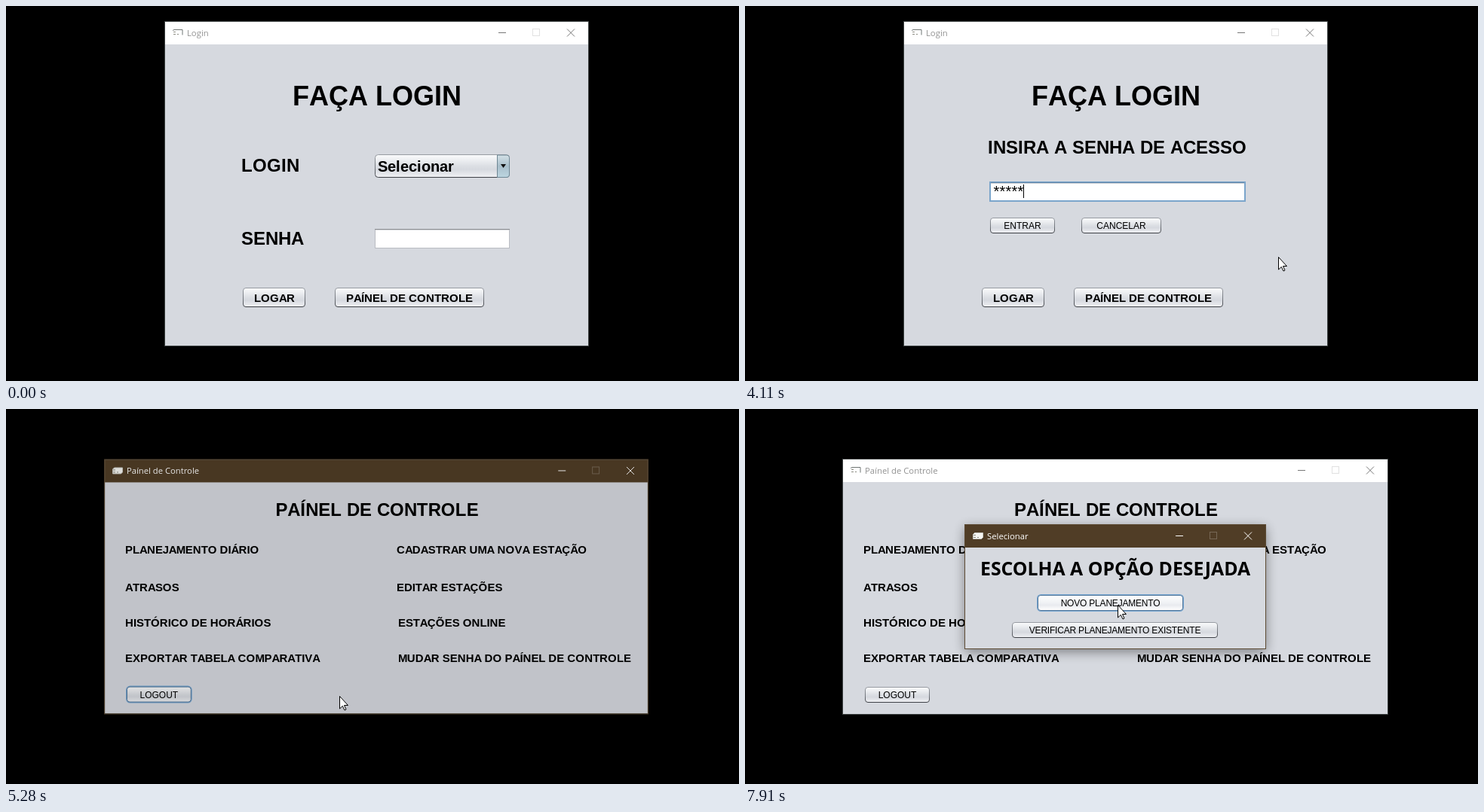
Write an HTML page that moves like this. It is 972 px wide and 498 px high and loops after 8 s.

```html
<!DOCTYPE html>
<html lang="pt">
<head>
<meta charset="utf-8">
<title>Login</title>
<style>
html, body { margin: 0; width: 100%; height: 100%; overflow: hidden; background: #000; }
svg { display: block; width: 100vw; height: 100vh; }
text { font-family: "Liberation Sans", Arial, sans-serif; fill: #000; white-space: pre; }
.b { font-weight: 700; }
.mid { text-anchor: middle; }
.cap { font-family: "Open Sans", "Noto Sans", sans-serif; font-size: 11.3px; }
.head { font-family: "Open Sans", "Noto Sans", sans-serif; font-weight: 700; font-size: 24.8px; }
.win .bar { fill: #fff; }
.win .cap { fill: #929292; }
.win .glyph { stroke: #777; fill: none; }
.win .card { visibility: hidden; fill: #f6f6f2; stroke: #c9c9c4; }
.win .marks { stroke: #8a8a80; fill: none; }
.win .outline { stroke: #6f7573; fill: none; }
.win .edge { stroke: #3c4141; fill: none; }
.win.on .bar { fill: #503d26; }
.win.on .cap { fill: #fff; }
.win.on .glyph { stroke: #fff; }
.win.on .card { visibility: visible; }
.win.on .outline { visibility: hidden; }
.win.on .edge { stroke: #5c4a33; }
.win .dim { opacity: .22; }
.btn .face { fill: url(#face); stroke: url(#rim); }
.btn.hover .face { fill: url(#lit); }
.btn.down .face { fill: url(#dark); }
.btn.focus .face { stroke: #587a9b; }
.ring { fill: none; stroke: #73a4d1; stroke-width: 2; visibility: hidden; }
.focus .ring { visibility: visible; }
</style>
</head>
<body>
<svg id="stage" viewBox="0 0 972 498" preserveAspectRatio="none"></svg>
<script>
const LOOP = 8000;
const stage = document.getElementById('stage');
const ruler = document.createElement('canvas').getContext('2d');

const gradient = (id, ...stops) =>
  `<linearGradient id="${id}" x1="0" y1="0" x2="0" y2="1">` +
  stops.map(([at, color]) => `<stop offset="${at}" stop-color="${color}"/>`).join('') +
  '</linearGradient>';

const plain = (x, y, size, str, extra = '') =>
  `<text x="${x}" y="${y}" font-size="${size}" ${extra}>${str}</text>`;

// Bold text on whole-pixel advances, as hinted type sets it; A runs slightly narrow.
function bold(x, y, size, str, centered = false) {
  ruler.font = `700 ${size}px "Liberation Sans", Arial, sans-serif`;
  const xs = [0];
  for (const c of str) {
    const w = ruler.measureText(c).width - (/[AÁÃ]/.test(c) ? .4 : 0);
    xs.push(xs[xs.length - 1] + Math.round(w));
  }
  const start = centered ? Math.round(x - xs.pop() / 2) : x;
  return `<text class="b" x="${xs.map(v => v + start).join(' ')}" y="${y}" font-size="${size}">${str}</text>`;
}

function button(id, x, y, w, h, label) {
  return `<g id="${id}" class="btn">
    <rect class="ring" x="${x}" y="${y}" width="${w}" height="${h}" rx="4.5"/>
    <rect class="face" x="${x + .5}" y="${y + .5}" width="${w - 1}" height="${h - 1}" rx="3.5"/>
    ${label}</g>`;
}

const smallButton = (id, x, y, w, str, gap = 0) =>
  button(id, x, y, w, 21, plain(x + w / 2, y + 15, 12, str, `class="mid" letter-spacing="${gap}"`));

const bigButton = (id, x, y, w, str) =>
  button(id, x, y, w, 26, bold(x + w / 2, y + 19, 15, str, true));

function frameWindow(id, x, y, w, h, title, body) {
  const r = x + w, m = y + 14.5;
  return `<g id="${id}" class="win">
    ${id === 'dialog' ? `<rect x="${x}" y="${y + 4}" width="${w}" height="${h}" opacity=".45" filter="url(#blur)"/>` : ''}
    <rect x="${x}" y="${y}" width="${w}" height="${h}" fill="#d6d9df"/>
    <rect class="bar" x="${x}" y="${y}" width="${w}" height="30"/>
    <path class="outline" d="M${x + 10} ${m - 3}l2 -1h11v7"/>
    <path class="card" d="M${x + 12.5} ${m - 4}h11v6l-2 2h-11v-6z"/>
    <path class="marks" d="M${x + 11} ${m - 1}h3m-3 3h3m2 0h2"/>
    <text class="cap" x="${x + 29}" y="${y + 19}">${title}</text>
    <path class="glyph" d="M${r - 119} ${m}h10M${r - 28} ${m - 5}l10 10m0 -10l-10 10"/>
    <rect class="glyph dim" x="${r - 73.5}" y="${m - 5}" width="9" height="9"/>
    ${body}
    <rect class="edge" x="${x - .5}" y="${y - .5}" width="${w + 1}" height="${h + 1}"/>
  </g>`;
}

const loginBody = bold(380, 132, 36, 'FAÇA LOGIN') +
  '<g id="mainView">' +
    bold(312, 220, 24, 'LOGIN') + bold(312, 317, 24, 'SENHA') +
    `<rect x="489.5" y="197.5" width="178" height="30" rx="4" fill="url(#face)" stroke="url(#rim)"/>
     <path d="M651.5 198h12.5q3.5 0 3.5 3.5v22.5q0 3.5 -3.5 3.5h-12.5z" fill="url(#arrow)" stroke="#6f8794"/>
     <path d="M656 210h7l-3.5 5z" fill="#111"/>` +
    bold(493, 220, 20, 'Selecionar') +
    `<rect x="489.5" y="296.5" width="178" height="25" fill="#fff" stroke="#b9bcc2"/>
     <path d="M489 296.5h179" stroke="#8c8e92"/>
     <path d="M490 297.5h177" stroke="#d8d9dc"/>` +
  '</g><g id="passView">' +
    bold(322, 196, 24, 'INSIRA A SENHA DE ACESSO') +
    `<rect x="325" y="234" width="338" height="25" fill="#fff" stroke="#7ba5cb" stroke-width="2"/>
     <path d="M326 234.5h336" stroke="#5f86aa"/>
     <path d="M326 235.5h336" stroke="#c9cdd3"/>` +
    plain(329.5, 253, 20, '', 'id="stars" letter-spacing=".22"') +
    '<rect id="caret" y="237" width="1" height="18"/>' +
    smallButton('enter', 325, 281, 86, 'ENTRAR') +
    smallButton('cancel', 446, 281, 106, 'CANCELAR') +
  '</g>' +
  bigButton('logar', 314, 374, 83, 'LOGAR') +
  bigButton('open', 436, 374, 198, 'PAÍNEL DE CONTROLE');

const rows = [
  ['PLANEJAMENTO DIÁRIO', 518, 'CADASTRAR UMA NOVA ESTAÇÃO', 192],
  ['ATRASOS', 518, 'EDITAR ESTAÇÕES', 242],
  ['HISTÓRICO DE HORÁRIOS', 520, 'ESTAÇÕES ONLINE', 289],
  ['EXPORTAR TABELA COMPARATIVA', 520, 'MUDAR SENHA DO PAÍNEL DE CONTROLE', 336]
];
const panelBody = bold(357, 142, 24, 'PAÍNEL DE CONTROLE') +
  rows.map(([left, x, right, y]) => bold(157, y, 15, left) + bold(x, y, 15, right)).join('') +
  smallButton('logout', 159, 369, 86, 'LOGOUT');

const dialogBody = '<text class="head" x="312" y="221">ESCOLHA A OPÇÃO DESEJADA</text>' +
  smallButton('create', 388, 247, 193, 'NOVO PLANEJAMENTO', -.2) +
  smallButton('verify', 354, 283, 273, 'VERIFICAR PLANEJAMENTO EXISTENTE', -.2);

stage.innerHTML = '<defs>' +
  gradient('face', [0, '#fafbfc'], [.25, '#eceef1'], [.5, '#dcdfe4'], [.65, '#d6d9df'], [1, '#f0f1f4']) +
  gradient('lit', [0, '#ffffff'], [.5, '#eff1f4'], [.65, '#e9ebef'], [1, '#ffffff']) +
  gradient('dark', [0, '#9aa8b8'], [.55, '#7c8da1'], [1, '#b3c0ce']) +
  gradient('rim', [0, '#979ba2'], [.6, '#70747a'], [1, '#3d4046']) +
  gradient('arrow', [0, '#d3e0e6'], [.5, '#a9bfcb'], [1, '#bcd5e0']) +
  '<filter id="blur" x="-10%" y="-20%" width="120%" height="140%"><feGaussianBlur stdDeviation="8"/></filter></defs>' +
  '<rect width="972" height="498"/>' +
  frameWindow('panel', 130, 67, 722, 338, 'Paínel de Controle', panelBody) +
  frameWindow('login', 211, 21, 561, 430, 'Login', loginBody) +
  frameWindow('dialog', 292, 154, 398, 164, 'Selecionar', dialogBody) +
  '<path id="cursor" d="M.5 .5v16.5l3.8 -3.6 2.7 5.6 2 -1 -2.5 -5.5h5z" fill="#fff" stroke="#000"/>';

const el = {};
stage.querySelectorAll('[id]').forEach(node => el[node.id] = node);

// Mouse moves: start, end, steps, control point, end point
const moves = [
  [70, 300, 4, 640, 405, 546, 413],
  [450, 680, 4, 540, 405, 530, 386],
  [1300, 1550, 4, 630, 355, 690, 336],
  [4110, 4110, 1, 707, 333, 707, 333],
  [4190, 4810, 9, 720, 325, 374, 289],
  [5120, 5120, 1, 377, 300, 377, 300],
  [5200, 5280, 2, 405, 345, 442, 381],
  [5360, 5520, 3, 446, 383, 446, 379],
  [5660, 6430, 11, 350, 205, 627, 206],
  [6510, 7040, 8, 272, 169, 311, 186],
  [7290, 7680, 6, 420, 230, 489, 289],
  [7830, 7910, 2, 491, 275, 494, 260]
];

function mouseAt(t) {
  let x = 822, y = 473;
  for (const [from, to, n, cx, cy, ex, ey] of moves) {
    if (t < from) break;
    const k = t >= to ? n : 1 + Math.floor((t - from) / (to - from) * (n - 1));
    const u = k / n, v = 1 - u;
    x = v * v * x + 2 * u * v * cx + u * u * ex;
    y = v * v * y + 2 * u * v * cy + u * u * ey;
  }
  return [Math.round(x), Math.round(y)];
}

const within = (t, a, b) => t >= a && t < b;
const show = (node, on) => node.style.display = on ? '' : 'none';
const toggle = (node, cls, on) => node.classList.toggle(cls, on);

// Window fades advance in 80 ms ticks: [opacity, scale]
const opening = [[.1, .93], [.44, .972], [.74, .989], [.9, .997], [1, 1]];
const closing = [[.7, .99], [.2, .964], [0, .93]];
const tick = (list, t, from) => list[Math.min(list.length - 1, Math.floor((t - from) / 80))];

function pose(node, [alpha, scale], cx, cy) {
  show(node, alpha > 0);
  node.setAttribute('opacity', alpha);
  node.setAttribute('transform', `translate(${cx} ${cy}) scale(${scale}) translate(${-cx} ${-cy})`);
}

const keys = [2400, 2630, 2860, 3030, 3110];

function draw(t) {
  const pass = within(t, 1220, 4960);
  show(el.mainView, !pass);
  show(el.passView, pass);
  pose(el.login, t < 5040 ? [1, 1] : tick(closing, t, 5040), 491, 235.5);
  pose(el.panel, t < 5040 ? [0, 1] : tick(opening, t, 5040), 491, 236);
  pose(el.dialog, t < 7290 ? [0, 1] : tick(opening, t, 7290), 491, 236);

  toggle(el.login, 'on', within(t, 1140, 1300));
  toggle(el.panel, 'on', t < 7290);
  toggle(el.dialog, 'on', true);
  toggle(el.logout, 'focus', t < 7290);
  toggle(el.create, 'focus', true);

  toggle(el.open, 'hover', within(t, 600, 1140));
  toggle(el.open, 'down', within(t, 1140, 1220));
  toggle(el.enter, 'hover', t >= 4720);
  toggle(el.verify, 'hover', within(t, 7600, 7830));
  toggle(el.create, 'hover', t >= 7910);

  const typed = keys.filter(k => t >= k).length;
  el.stars.textContent = '*'.repeat(typed);
  el.caret.setAttribute('x', 329 + 8 * typed);
  show(el.caret, within(t, 1380, 1850) || within(t, 2330, 3640) || within(t, 4110, 4580));

  const [x, y] = mouseAt(t);
  show(el.cursor, t >= 70);
  el.cursor.setAttribute('transform', `translate(${x} ${y})`);
}

function loop() {
  draw(performance.now() % LOOP);
  requestAnimationFrame(loop);
}
loop();
</script>
</body>
</html>
```
